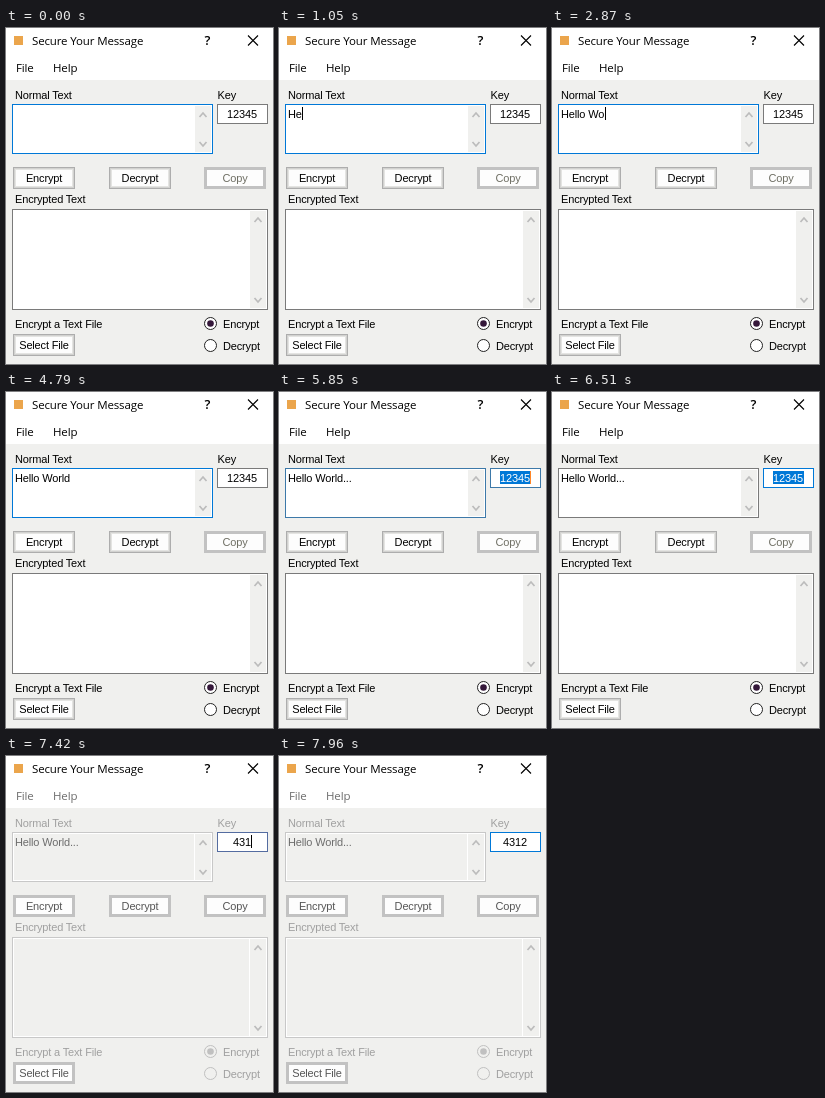
An HTML page that plays this animation: 267 px wide and 336 px high, repeating every 8 s.

```html
<!DOCTYPE html>
<html lang="en">
<head>
<meta charset="utf-8">
<title>Secure Your Message</title>
<style>
html, body { margin: 0; width: 100%; height: 100%; overflow: hidden; background: #f0f0ee; }
svg { display: block; width: 100vw; height: 100vh; }
text { font: 11px "Liberation Sans", Arial, sans-serif; letter-spacing: -.16px; fill: #000; white-space: pre; }
.ui { font: 11.5px "Open Sans", "Noto Sans", sans-serif; letter-spacing: -.13px; }
.help { font-size: 13px; font-weight: 600; }
.mid { text-anchor: middle; }
.box { fill: #fff; stroke: #7a7a7a; }
.page { fill: #fff; }
.track { fill: #f0f0ee; }
.arrow { fill: none; stroke: #bcbcbc; stroke-width: 1.7; }
.rim { fill: #adadad; }
.bevel { fill: #d2d2d0; }
.lip { fill: #e4e4e2; }
.face { fill: #fdfdfd; }
.ring { fill: #fff; stroke: #222; }
.dot { fill: #35183a; }
.off .menu { fill: #6d6d6d; }
.off .label { fill: #a0a0a0; }
.off .typed { fill: #6d6d6d; }
.off .box { stroke: #c8c8c8; }
.off .page { fill: #f0f0ee; }
.off .rim, .off .bevel, .off .lip,
.dim .rim, .dim .bevel, .dim .lip { fill: #c2c2c2; }
.off .cap { fill: #555; }
.dim .cap { fill: #6f6f64; }
.off .ring { fill: #f0f0ee; stroke: #c0c0c0; }
.off .dot { fill: #c0c0c0; }
</style>
</head>
<body>
<svg id="stage" viewBox="0 0 267 336" xmlns="http://www.w3.org/2000/svg"></svg>
<script>
const stage = document.getElementById("stage");
const LOOP = 8000, DISABLE = 6970;
const BLUE = [0, 120, 215], GRAY = [122, 122, 122], SLATE = [84, 108, 160], BLACK = [0, 0, 0];

let parent = stage;
function add(tag, attrs, content) {
  const el = document.createElementNS("http://www.w3.org/2000/svg", tag);
  for (const k in attrs) el.setAttribute(k, attrs[k]);
  if (content) el.textContent = content;
  return parent.appendChild(el);
}
const rect = (x, y, width, height, cls, fill = "none") =>
  add("rect", { x, y, width, height, class: cls, fill });
const text = (x, y, s, cls) => add("text", { x, y, class: cls }, s);
const box = (x, y, w, h, cls = "box") => rect(x + .5, y + .5, w - 1, h - 1, cls);

function arrow(x, y, dir) {
  add("path", { class: "arrow", d: `M${x - 3.5} ${y + 2 * dir}L${x} ${y - 2 * dir}L${x + 3.5} ${y + 2 * dir}` });
}
function textArea(x, y, w, h) {
  const frame = box(x, y, w, h);
  rect(x + 2, y + 2, w - 21, h - 4, "page");
  rect(x + w - 18, y + 2, 16, h - 4, "track");
  arrow(x + w - 10, y + 11, 1);
  arrow(x + w - 10, y + h - 10, -1);
  return frame;
}
function button(x, y, s) {
  const group = parent = add("g", {});
  ["rim", "bevel", "lip", "face"].forEach((cls, i) =>
    rect(x + i, y + i, 62 - 2 * i, 22 - 2 * i, cls));
  text(x + 31, y + 15, s, "cap mid");
  parent = stage;
  return group;
}
function radio(y, s, on) {
  add("circle", { cx: 204.5, cy: y, r: 6, class: "ring" });
  if (on) add("circle", { cx: 204.5, cy: y, r: 3.3, class: "dot" });
  text(217, y + 4.5, s, "label");
}

// Window chrome
rect(0, 0, 267, 336, "", "#f0f0ee");
rect(0, 0, 267, 52, "", "#fff");
rect(8, 8, 9, 9, "", "#eba54c");
text(26, 17, "Secure Your Message", "ui");
text(198.5, 17, "?", "ui help");
add("path", { d: "M242 7.5l10 10M252 7.5l-10 10", stroke: "#000", "stroke-width": 1.1 });
text(10, 44, "File", "ui menu");
text(47, 44, "Help", "ui menu");

// Form
text(9, 71, "Normal Text", "label");
text(211.5, 71, "Key", "label");
const noteFrame = textArea(6, 76, 201, 50);
const noteText = text(9, 90, "", "typed");
const noteCaret = rect(9, 79, 1, 13, "", "#000");
const keyFrame = box(211, 76, 51, 20, "");
keyFrame.style.fill = "#fff";
const mark = rect(221, 79, 31, 13, "", "#0078d7");
const keyText = text(236, 90, "", "mid");
const keyCaret = rect(251, 79, 1, 13, "", "#000");
button(7, 139, "Encrypt");
button(103, 139, "Decrypt");
const copy = button(198, 139, "Copy");
text(9, 175, "Encrypted Text", "label");
textArea(6, 181, 256, 101);
text(9, 300, "Encrypt a Text File", "label");
button(7, 306, "Select File");
radio(295.5, "Encrypt", true);
radio(317.5, "Decrypt", false);

// Typing
const NOTE = "Hello World...", KEY = "4312";
const noteTimes = [710, 1050, 1630, 1850, 2070, 2310, 2530, 2870, 3310, 3650, 4230, 4910, 5130, 5370];
const keyTimes = [6970, 7200, 7420, 7640];
const advance = { H: 8, e: 6, l: 2, o: 6, " ": 3, W: 11, r: 3, d: 6, ".": 3 };

const typed = (s, times, t) => s.slice(0, times.filter(v => v <= t).length);
const show = (el, on) => el.setAttribute("visibility", on ? "visible" : "hidden");
const mix = (a, b, p) => `rgb(${a.map((v, i) => Math.round(v + (b[i] - v) * p))})`;
const between = (t, a, b) => t >= a && t < b;
const steps = (t, from, to, n) =>
  Math.max(0, Math.min(n, Math.floor((t - from) / (to - from) * n + .001))) / n;

function draw(t) {
  const off = t >= DISABLE;
  stage.setAttribute("class", off ? "off" : "");
  copy.setAttribute("class", off ? "" : "dim");

  const note = typed(NOTE, noteTimes, t);
  noteText.textContent = note;
  noteCaret.setAttribute("x", [...note].reduce((x, c) => x + advance[c], 9));
  show(noteCaret, between(t, 590, 4790) || between(t, 4910, 5850));

  // Focus moves from the note to the key in two steps
  const focus = t < 5850 ? 0 : t < 5950 ? .5 : 1;
  noteFrame.style.stroke = off ? "" : mix(BLUE, GRAY, focus);
  keyFrame.style.stroke = off ? mix(SLATE, BLUE, steps(t, 7533, 7960, 4)) : mix(GRAY, BLUE, focus);

  const selected = between(t, 5850, DISABLE);
  const key = off ? typed(KEY, keyTimes, t) : "12345";
  const ink = off ? mix(GRAY, BLACK, steps(t, DISABLE, 7420, 4)) : "#000";
  keyText.textContent = key;
  keyText.style.fill = selected ? "#fff" : ink;
  show(mark, selected);
  show(keyCaret, between(t, 5850, 6510) || between(t, DISABLE, 7960));
  keyCaret.setAttribute("x", selected ? 251 : 236 + 3 * key.length);
  keyCaret.setAttribute("fill", selected ? "#ff8728" : ink);
}

const start = performance.now();
function tick() {
  draw((performance.now() - start) % LOOP);
  requestAnimationFrame(tick);
}
tick();
</script>
</body>
</html>
```
